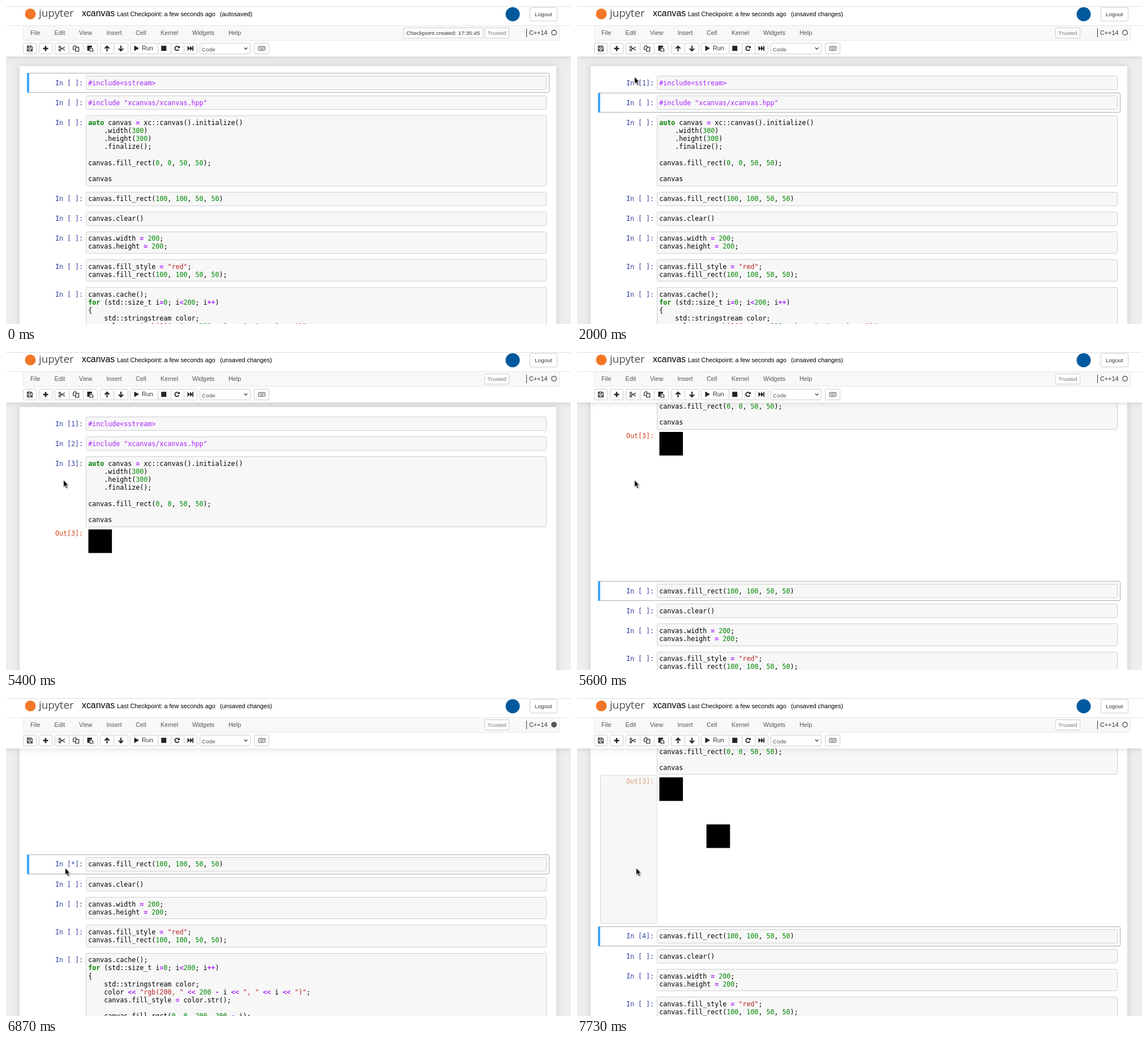
These frames come from a looping animation (998 by 561 pixels, 8 s). An HTML page:

```html
<!DOCTYPE html>
<html lang="en">
<head>
<meta charset="utf-8">
<title>xcanvas notebook</title>
<style>
html, body { margin: 0; width: 100%; height: 100%; overflow: hidden; background: #eee; }
body { position: relative; }
svg { position: absolute; left: 0; top: 0; }
text { white-space: pre; font: 10.82px "Liberation Sans", Arial, sans-serif; }
#sheet, #head { position: absolute; background: #fff; box-shadow: 0 0 10px 1px rgba(87, 87, 87, .2); }
#sheet { left: 24px; top: 106px; width: 948px; height: 1300px; }
#head { left: 0; top: 0; width: 998px; height: 89px; }
.code { font: 11.65px "DejaVu Sans Mono", monospace; }
.small { font-size: 9.98px; }
.meta { fill: #a2f; }
.op { fill: #a2f; font-weight: bold; }
.key { fill: #008000; font-weight: bold; }
.num { fill: #080; }
.str { fill: #ba2121; }
.line { fill: none; stroke: #222; stroke-width: 1.2; }
</style>
</head>
<body>
<div id="sheet"></div>
<svg id="cells" width="998" height="561"></svg>
<div id="head">
  <svg id="bar" width="998" height="89"></svg>
  <svg id="status" width="998" height="89"></svg>
</div>
<svg id="mouse" width="998" height="561">
  <path d="M0 0V12L2.7 9.6 4.8 14.2 6.9 13.2 4.8 8.8H8.4Z" stroke="#fff" stroke-width=".8"
    style="filter: drop-shadow(1px 1px 1px rgba(0, 0, 0, .35))"/>
</svg>
<script>
const $ = id => document.getElementById(id);
const FPS = 15, LOOP = 8000;
const ZOOM = .832, LINE = 17 * ZOOM, OUT_H = 262.45;
const SCROLL_MAX = 309.1, SCROLL_END = 182.1;

const sources = [
  '#include<sstream>',
  '#include "xcanvas/xcanvas.hpp"',
  `auto canvas = xc::canvas().initialize()
    .width(300)
    .height(300)
    .finalize();

canvas.fill_rect(0, 0, 50, 50);

canvas`,
  'canvas.fill_rect(100, 100, 50, 50)',
  'canvas.clear()',
  'canvas.width = 200;\ncanvas.height = 200;',
  'canvas.fill_style = "red";\ncanvas.fill_rect(100, 100, 50, 50);',
  `canvas.cache();
for (std::size_t i=0; i<200; i++)
{
    std::stringstream color;
    color << "rgb(200, " << 200 - i << ", " << i << ")";
    canvas.fill_style = color.str();

    canvas.fill_rect(0, 0, 200, 200 - i);
}`
];

const esc = s => s.replace(/&/g, '&amp;').replace(/</g, '&lt;');
const text = (x, y, s, fill = '#000', cls = '') =>
  `<text x="${x}" y="${y}" fill="${fill}" class="${cls}">${s}</text>`;

// A rectangle with a crisp one-pixel border; edges are whole pixels.
const box = (x, y, x2, y2, stroke = '#ccc', fill = '#fff', r = 2) =>
  `<rect x="${x + .5}" y="${y + .5}" width="${x2 - x - 1}" height="${y2 - y - 1}" rx="${r}" fill="${fill}" stroke="${stroke}"/>`;

const token = /(^#.*)|("[^"]*")|\b(auto|for)\b|\b(\d+)\b|(<<|\+\+|[=<-])/g;
const kinds = ['meta', 'str', 'key', 'num', 'op'];

function highlight(line) {
  let html = '', end = 0;
  for (const m of line.matchAll(token)) {
    const kind = kinds[m.slice(1).findIndex(Boolean)];
    html += esc(line.slice(end, m.index)) + `<tspan class="${kind}">${esc(m[0])}</tspan>`;
    end = m.index + m[0].length;
  }
  return html + esc(line.slice(end));
}

const cells = sources.map(s => s.split('\n').map(highlight));

// Linear interpolation between rows of [frame, ...values].
function track(rows, n) {
  const i = rows.findIndex(r => r[0] > n);
  if (i < 0) return rows[rows.length - 1].slice(1);
  if (i === 0) return rows[0].slice(1);
  const a = rows[i - 1], b = rows[i], k = (n - a[0]) / (b[0] - a[0]);
  return a.slice(1).map((v, j) => v + (b[j + 1] - v) * k);
}

const pointer = [
  [1, 124, 2], [4, 98, 52], [6, 87, 95], [8, 97, 118], [10, 104, 124], [12, 104, 124],
  [15, 102, 125], [63, 102, 125], [64, 102, 157], [65, 102, 190], [66, 102, 216], [67, 102, 226],
  [90, 102, 226], [91, 102, 232], [93, 104, 266], [95, 105, 300]
];
const scrollBack = [[112, SCROLL_MAX], [113, 288], [114, 288], [115, 218], [116, SCROLL_END]];

function scrollAt(n) {
  if (n > 87) return track(scrollBack, n)[0];
  const k = Math.max(0, (n - 80.266) / 6.734);
  return SCROLL_MAX * (1 - Math.cos(Math.PI * k)) / 2;
}

const within = (n, a, b) => n >= a && n < b;
const prompt = (n, start, done, count) => n >= done ? count : n >= start ? '*' : ' ';

function drawCells(n, scroll, hover) {
  const counts = [prompt(n, 30, 30, 1), prompt(n, 36, 41, 2), prompt(n, 48, 73, 3), prompt(n, 103, 111, 4)];
  const selected = [30, 36, 48].filter(f => n >= f).length;
  let html = '', y = 118.2 - scroll;
  cells.forEach((lines, i) => {
    const top = y + 5, bottom = top + 13.2 * ZOOM + lines.length * LINE;
    const base = k => Math.round(top + 16.5 + k * LINE);
    y = bottom + 5;
    const hasOut = i === 2 && n >= 73;
    if (hasOut) y += OUT_H;
    if (i === selected) {
      const a = Math.round(top - 5), b = Math.round(y);
      html += box(37, a, 960, b, '#ababab') +
        `<rect x="37" y="${a}" width="4" height="${b - a}" rx="1" fill="#42a5f5"/>`;
    }
    html += box(141, Math.round(top), 955, Math.round(bottom), '#cfcfcf', '#f7f7f7') +
      text(87, base(0), `In [${counts[i] ?? ' '}]:`, '#303f9f', 'code');
    lines.forEach((s, k) => { html += text(145.2, base(k), s, '#000', 'code'); });
    if (hasOut) html += drawOutput(bottom, n, hover);
  });
  return html;
}

function drawOutput(y, n, hover) {
  const square = p => `<rect x="${145.5 + p * ZOOM}" y="${Math.round(y + 4.5 + p * ZOOM)}" width="41.6" height="41.6"/>`;
  return text(87, Math.round(y + 15.4), 'Out[3]:', '#d84315', 'code') +
    square(0) + (n >= 111 ? square(100) : '') +
    (hover ? box(41, Math.round(y + .5), 142, Math.round(y + OUT_H), 'rgba(0,0,0,.12)', 'rgba(240,240,240,.5)', 1) : '');
}

function drawStatus(n) {
  const saved = n < 30 || n === 48;
  const busy = within(n, 36, 42) || within(n, 48, 74) || within(n, 103, 111);
  let html = text(378, 18, saved ? '(autosaved)' : '(unsaved changes)');
  if (n < 19) {
    html += `<g opacity="${n < 18 ? 1 : .5}">` + box(702, 38, 843, 57) +
      text(707, 51, 'Checkpoint created: 17:35:45', '#333', 'small') + '</g>';
  }
  if (within(n, 48, 78)) html += box(760, 38, 843, 57) + text(765.5, 51, 'Notebook saved', '#333', 'small');
  return html + `<circle cx="968" cy="47" r="4.3" fill="${busy ? '#555' : 'none'}" stroke="#555" stroke-width="1.4"/>`;
}

function drawBar() {
  const menu = { File: 43, Edit: 85.5, View: 129, Insert: 177.5, Cell: 229, Kernel: 273, Widgets: 329, Help: 393 };
  const buttons = [[30, 54], [58, 82], [86, 112], [111, 137], [136, 162], [166, 191], [190, 216],
    [219, 269], [268, 292], [291, 315], [314, 338], [342, 432], [438, 465]];
  const solid = d => `<path d="${d}" fill="#222"/>`;
  const line = d => `<path d="${d}" class="line"/>`;
  return [
    '<path d="M0 .5H998" stroke="#ddd"/><path d="M0 34.5H998" stroke="#e7e7e7"/>',
    '<circle cx="43" cy="14" r="9.5" fill="#f37726"/><circle cx="895" cy="14.5" r="12.5" fill="#00599c"/>',
    '<text x="58" y="18.5" fill="#4e4e4e" style="font: 18.8px \'Open Sans\', sans-serif">jupyter</text>',
    '<text x="134" y="18" style="font-size: 15.85px">xcanvas</text>',
    text(196, 18, 'Last Checkpoint: a few seconds ago'),
    box(925, 2, 974, 27), text(934, 18, 'Logout', '#333', 'small'),
    box(30, 34, 978, 61, '#e7e7e7', '#f8f8f8'),
    ...Object.entries(menu).map(([s, x]) => text(x, 51, s, '#555')),
    box(845, 38, 889, 57), text(850.2, 51, 'Trusted', '#777', 'small'),
    '<path d="M919.5 40V55" stroke="#333"/>', text(924, 51, 'C++14', '#333'),
    ...buttons.map(([a, b]) => box(a, 65, b, 85)),
    // save, add, cut
    line('M37.6 70.6H44.5L46.4 72.5V79.4H37.6ZM39.5 79V76H44.5V79M39.5 71V73.5H43.5V71'),
    solid('M68.7 70.5H71.3V73.7H74.5V76.3H71.3V79.5H68.7V76.3H65.5V73.7H68.7Z'),
    line('M96.5 73.6L104 78M96.5 76.6L104 72'),
    '<circle cx="95" cy="72.4" r="1.6" class="line"/><circle cx="95" cy="77.7" r="1.6" class="line"/>',
    // copy, paste
    line('M122.5 77H118.6V72.5L120.8 70H123.5V73M122.8 80V75L125 72.8H128.6V80Z'),
    solid('M143.5 70H152V73H149L147 75V79H143.5Z'),
    line('M148.2 80V74.5H151.5L153.6 76.6V80Z'),
    // move up, move down
    '<path d="M178.5 80V71M174.4 75L178.5 70.9 182.6 75M203 70V79M198.9 75L203 79.1 207.1 75" class="line" style="stroke-width:2"/>',
    // run, stop, restart, run all
    solid('M226.5 69.8L235 74.6 226.5 79.4Z'), text(240, 78, 'Run', '#333'),
    solid('M274.2 70.2H283.2V79.2H274.2Z'),
    '<path d="M305 72.5A3.7 3.7 0 1 0 305.4 76.3" class="line" style="stroke-width:1.8"/>',
    solid('M307 70V74.3H302.7Z'),
    solid('M320.5 70.2L325 74.7V70.2L329.3 74.5V70.2H331V79.2H329.3V75L325 79.2V74.8L320.5 79.2Z'),
    text(346, 80, 'Code', '#555', 'small'),
    line('M420.8 73.4L423.6 76.2 426.4 73.4'),
    // keyboard
    '<rect x="446" y="71.3" width="11.6" height="7" rx=".8" fill="none" stroke="#444"/>',
    '<path d="M448 73.5H456M448 75H456M449.5 76.6H454" stroke="#444" stroke-dasharray="1.1 .6" stroke-width=".9"/>'
  ].join('');
}

$('bar').innerHTML = drawBar();

let last = -1;
function tick() {
  const n = Math.floor(performance.now() % LOOP * FPS / 1000 + .06);
  if (n !== last) {
    last = n;
    const [x, y] = track(pointer, n), scroll = scrollAt(n);
    const hover = n >= 116 || n >= 91 && y < 271;
    $('sheet').style.transform = `translateY(${-Math.round(scroll)}px)`;
    $('cells').innerHTML = drawCells(n, scroll, hover);
    $('status').innerHTML = drawStatus(n);
    $('mouse').style.display = n < 1 ? 'none' : '';
    $('mouse').firstElementChild.setAttribute('transform', `translate(${x - .4} ${y})`);
  }
  requestAnimationFrame(tick);
}
tick();
</script>
</body>
</html>
```
